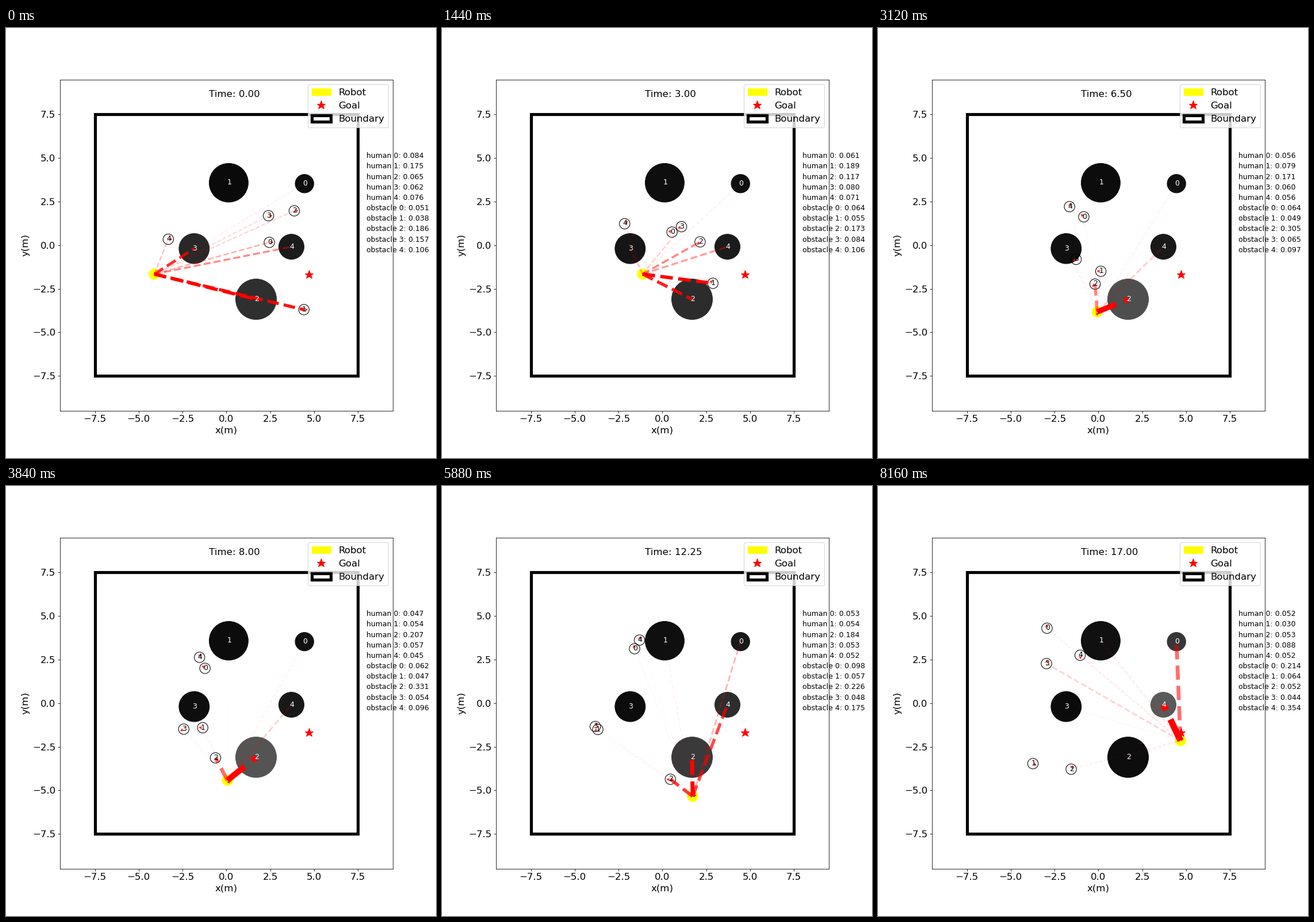
These frames come from a looping animation (748 by 748 pixels, 8280 ms). A matplotlib script:

```python
import numpy as np
import matplotlib.pyplot as plt
from matplotlib.animation import FuncAnimation
from matplotlib.patches import ArrowStyle, Circle, FancyArrowPatch, Rectangle

STEPS, INTERVAL, DT = 69, 120, 0.25
RADIUS = 0.3
GOAL = (4.71, -1.707)
KEY_STEPS = [0, 12, 20, 32, 41, 57, 68]


def path(xs, ys, *turns):
    """Rows of step, x, y: the key positions plus extra turning points."""
    return np.array(sorted([*zip(KEY_STEPS, xs, ys), *turns])).T


robot_path = path([-4.11, -1.13, -.02, .06, 1.14, 2.74, 4.68],
                  [-1.66, -1.66, -2.62, -4.43, -5.62, -4.13, -2.15],
                  (18, .09, -2.35), (28, -.08, -4.23), (35, .55, -4.98),
                  (39, 1.23, -5.47), (49, 1.73, -5.35))
human_paths = [
    path([2.45, .55, -.44, -1.22, -1.45, -1.72, -2.93],
         [.16, .75, 1.25, 2, 2.63, 3.62, 4.3], (65, -2.86, 3.88)),
    path([4.42, 2.88, 1.63, -1.35, -3.14, -4.43, -3.73],
         [-3.7, -2.19, -1.59, -1.41, -1.1, -2.35, -3.47],
         (40, -3.22, -1.1), (45, -2.99, -1.23), (53, -4.37, -1.79),
         (62, -4.52, -3.11)),
    path([3.87, 2.15, .82, -.62, 1.14, -1.29, -1.55],
         [1.97, .19, -1.31, -3.14, -4.48, -4.5, -3.79],
         (30, -.86, -2.85), (45, 1.33, -4.3), (63, -1.88, -4.43)),
    path([2.4, 1.09, -.11, -2.43, -3.96, -3.45, -2.96],
         [1.69, 1.06, -.14, -1.49, -1.64, -.43, 2.27],
         (35, -3.17, -1.59), (50, -3.81, -1.3)),
    path([-3.31, -2.15, -1.76, -1.53, -1.39, -1.22, -1.04],
         [.34, 1.23, 1.79, 2.63, 3.24, 4, 2.75], (60, -1.2, 4.1)),
]
# x, y, radius
OBSTACLES = [(4.453, 3.53, .53), (.133, 3.58, 1.112), (1.693, -3.105, 1.163),
             (-1.837, -.198, .865), (3.708, -.092, .721)]

# attention per key step in thousandths: five humans, then five obstacles
WEIGHTS = np.array([
    [84, 175, 65, 62, 76, 51, 38, 186, 157, 106],
    [61, 189, 117, 80, 71, 64, 55, 173, 84, 106],
    [64, 104, 135, 63, 67, 65, 50, 279, 75, 98],
    [47, 54, 207, 57, 45, 62, 47, 331, 54, 96],
    [56, 52, 307, 54, 58, 85, 61, 160, 50, 117],
    [50, 57, 62, 53, 45, 110, 54, 292, 45, 233],
    [52, 30, 53, 88, 52, 214, 64, 52, 44, 354],
]) / 1000


def place(track, step):
    t, x, y = track
    return np.array([np.interp(step, t, x), np.interp(step, t, y)])


def heading(track, step):
    if step == 0:
        return np.array([1.0, 0.0])
    d = place(track, step) - place(track, step - 1)
    return d / max(np.hypot(*d), 1e-9)


def attention(step):
    return np.array([np.interp(step, KEY_STEPS, w) for w in WEIGHTS.T])


def number(pos, i, color):
    return ax.text(pos[0] - 0.1, pos[1] - 0.1, str(i), color=color, fontsize=12)


fig, ax = plt.subplots(figsize=(10, 10), dpi=74.8)
ax.set(xlim=(-9.5, 9.5), ylim=(-9.5, 9.5))
ticks = np.arange(-7.5, 8, 2.5)
ax.set_xticks(ticks)
ax.set_yticks(ticks)
ax.tick_params(labelsize=16)
ax.set_xlabel('x(m)', fontsize=16)
ax.set_ylabel('y(m)', fontsize=16)

boundary = ax.add_patch(Rectangle((-7.5, -7.5), 15, 15, fill=False, lw=5))
goal, = ax.plot(*GOAL, '*', color='red', ms=15)
discs = [ax.add_patch(Circle((x, y), r, color='black')) for x, y, r in OBSTACLES]
for i, obstacle in enumerate(OBSTACLES):
    number(obstacle, i, 'white')
robot = ax.add_patch(Circle((0, 0), RADIUS, color='yellow'))
rings = [ax.add_patch(Circle((0, 0), RADIUS, fill=False)) for _ in human_paths]
labels = [number((0, 0), i, 'black') for i in range(len(human_paths))]

head = ArrowStyle('->', head_length=4, head_width=2)
arrows = [ax.add_patch(FancyArrowPatch((0, 0), (RADIUS, 0), color='red',
                                       arrowstyle=head, mutation_scale=1))
          for _ in range(len(human_paths) + 1)]
rays = [ax.plot([], [], '--', color='red')[0] for _ in range(10)]

clock = ax.text(-1, 8.5, '', fontsize=16)
names = [f'{kind} {i}' for kind in ('human', 'obstacle') for i in range(5)]
scores = [ax.text(8, 5 - 0.6 * i, '', fontsize=12) for i in range(10)]
ax.legend([robot, goal, boundary], ['Robot', 'Goal', 'Boundary'],
          loc='upper right', fontsize=16)


def update(step):
    base = place(robot_path, step)
    people = [place(p, step) for p in human_paths]
    att = attention(step)
    alpha = (att - att.min()) / (att.max() - att.min())

    robot.center = base
    for ring, label, pos in zip(rings, labels, people):
        ring.center = pos
        label.set_position(pos - 0.1)
    for arrow, track, pos in zip(arrows, [robot_path] + human_paths,
                                 [base] + people):
        arrow.set_positions(pos, pos + RADIUS * heading(track, step))
    for disc, a in zip(discs, att[5:]):
        disc.set_color(str(a))

    ends = people + [o[:2] for o in OBSTACLES]
    for i, (ray, end) in enumerate(zip(rays, ends)):
        ray.set_data([base[0], end[0]], [base[1], end[1]])
        ray.set_linewidth(30 * att[i])
        ray.set_alpha(alpha[i])
        scores[i].set_text(f'{names[i]}: {att[i]:.3f}')
    clock.set_text(f'Time: {step * DT:.2f}')
    return []


anim = FuncAnimation(fig, update, frames=STEPS, interval=INTERVAL, repeat=True)
plt.show()
```
